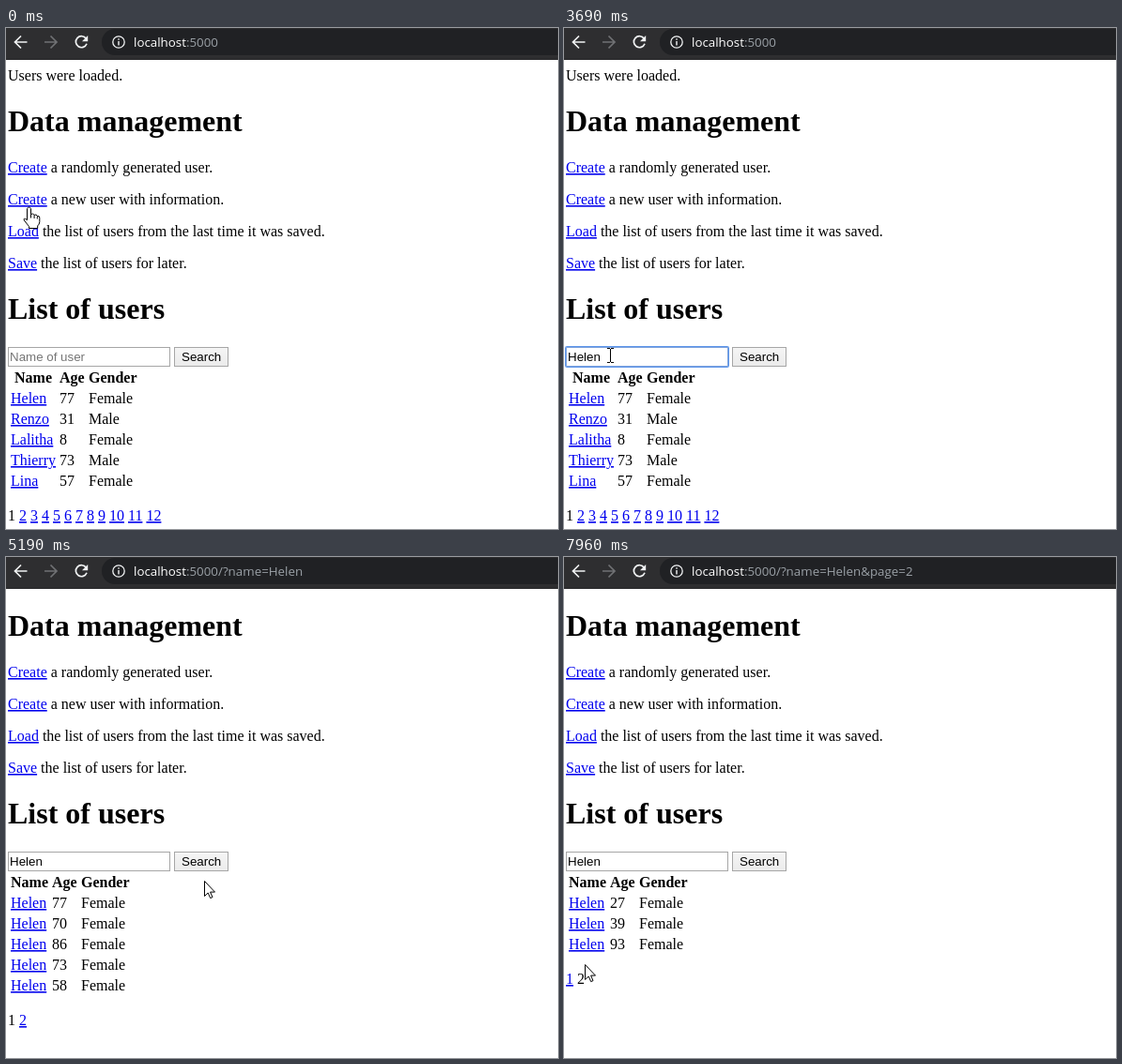
Write an HTML page that moves like this. It is 588 px wide and 534 px high and loops after 8 s.

```html
<!DOCTYPE html>
<html lang="en">
<head>
<meta charset="utf-8">
<title>User list</title>
<style>
html, body { margin: 0; width: 100%; height: 100%; overflow: hidden; background: #fff; }
svg { display: block; width: 588px; height: 534px; }
text { font: 16px "Liberation Serif", "Times New Roman", serif; fill: #000; }
.h1 { font-size: 32px; font-weight: bold; }
.th { font-weight: bold; }
.a {
  fill: #0000ee;
  text-decoration: underline 1px;
  text-underline-offset: 1px;
  text-decoration-skip-ink: auto;
}
.active { fill: #ff0000; }
.ui { font: 13.333px "Liberation Sans", Arial, sans-serif; }
.hint { fill: #757575; }
.url { font: 13.35px "Open Sans", "Noto Sans", sans-serif; fill: #9aa0a6; }
.host { fill: #fff; }
.icon { fill: none; stroke: #f1f3f4; stroke-width: 1.7; }
</style>
</head>
<body>
<svg viewBox="0 0 588 534">
  <defs>
    <linearGradient id="face" x1="0" y1="0" x2="0" y2="1">
      <stop offset="0" stop-color="#f5f5f5"/><stop offset="1" stop-color="#ebebeb"/>
    </linearGradient>
  </defs>
  <rect width="588" height="534" fill="#fff"/>
  <rect width="588" height="34" fill="#2e2e30"/>
  <rect y="33" width="588" height="1" fill="#252527"/>
  <rect x="102" y="1" width="520" height="28" rx="14" fill="#202124"/>
  <path class="icon" d="M22.5 15H10M16 8.5L9.5 15L16 21.5"/>
  <path class="icon" style="stroke:#707174" d="M41 15H53.5M47.5 8.5L54 15L47.5 21.5"/>
  <path class="icon" d="M85.3 11.3A6 6 0 1 0 86 16.8"/>
  <path d="M87.2 8V14.2H81Z" fill="#f1f3f4"/>
  <circle class="icon" cx="120" cy="15" r="6.2" style="stroke-width:1.3"/>
  <path d="M119.3 11.3h1.4v1.5h-1.4zM119.3 14h1.4v4.6h-1.4z" fill="#f1f3f4"/>
  <text class="url" x="136" y="20"><tspan class="host">localhost</tspan><tspan id="path"></tspan></text>
  <g id="page"></g>
  <g id="form">
    <rect id="field" x="2.5" y="340.5" width="172" height="20" fill="#fff" stroke="#a6a6a6"/>
    <rect id="ring" x="1.5" y="339.5" width="174" height="22" rx="1" fill="none" stroke="#5b94ea"/>
    <text id="value" class="ui" x="4" y="355"></text>
    <rect id="caret" y="343" width="1" height="15"/>
    <rect id="button" x="179.5" y="340.5" width="57" height="20" fill="url(#face)"/>
    <text class="ui" x="187" y="355">Search</text>
  </g>
  <g id="mouse" stroke="#000" stroke-linejoin="round">
    <path id="arrow" fill="#fff" d="M.5 .5V16.5L4.2 13L6.7 18.6L9 17.6L6.6 12.1H11.5Z"/>
    <g id="hand" transform="translate(.5 .5)">
      <path fill="#fff" d="M-2 2Q0 -1.2 2 2V8Q4.4 6.6 5.6 8.8Q8 7.6 8.8 9.9Q11.3 9.4 11.3 12V16Q11 19 9.2 20.4V23H0V21L-5.2 14.5Q-6 10.8 -2 14.2Z"/>
      <path fill="none" d="M2 8V12M5.6 9V12.5M8.8 10V13"/>
    </g>
    <path id="beam" fill="none" d="M-3 -6.5H0M1 -6.5H4M.5 -6V8M-3 8.5H0M1 8.5H4"/>
  </g>
</svg>
<script>
const LOOP = 8000;
const SEARCH = 5190, NEXT = 7280;
const NAME = "Helen";
const KEYS = [2450, 2630, 2760, 2940, 3140];
const $ = id => document.getElementById(id);
const show = (id, on) => $(id).setAttribute("visibility", on ? "visible" : "hidden");

// link text, link end, rest of the line, line end
const ACTIONS = [
  ["Create", 44, "a randomly generated user.", 220],
  ["Create", 44, "a new user with information.", 232],
  ["Load", 35, "the list of users from the last time it was saved.", 340],
  ["Save", 33, "the list of users for later.", 193]
];
const repeat = ages => ages.map(age => [NAME, age, "Female"]);
const PAGES = [
  { path: ":5000", shift: 0, cols: [5, 57, 88], head: 9, count: 12, current: 1,
    rows: [[NAME, 77, "Female"], ["Renzo", 31, "Male"], ["Lalitha", 8, "Female"],
           ["Thierry", 73, "Male"], ["Lina", 57, "Female"]] },
  { path: `:5000/?name=${NAME}`, shift: -26, cols: [5, 49, 80], head: 5, count: 2, current: 1,
    rows: repeat([77, 70, 86, 73, 58]) },
  { path: `:5000/?name=${NAME}&amp;page=2`, shift: -26, cols: [5, 49, 80], head: 5, count: 2, current: 2,
    rows: repeat([27, 39, 93]) }
];

// start, end, from, to
const MOVES = [
  [660, 1400, 24, 190, 49, 348],
  [4150, 4760, 49, 348, 211, 345],
  [5650, 6400, 211, 345, 20, 491],
  [7600, 7960, 20, 491, 22, 434]
];

const text = (x, y, body, cls = "") => `<text x="${x}" y="${y}" class="${cls}">${body}</text>`;
const link = (body, cls = "") => `<tspan class="a ${cls}">${body}</tspan>`;
const pagerY = p => 415 + p.shift + 22 * p.rows.length;

function pageMarkup(p, pressed) {
  const d = p.shift;
  let out = d ? "" : text(2, 56, "Users were loaded.");
  out += text(2, 110 + d, "Data management", "h1") + text(2, 310 + d, "List of users", "h1");
  ACTIONS.forEach(([a, , rest], i) => out += text(2, 154 + d + 34 * i, `${link(a)} ${rest}`));
  ["Name", "Age", "Gender"].forEach((h, i) => out += text(i ? p.cols[i] : p.head, 378 + d, h, "th"));
  p.rows.forEach((row, r) => row.forEach((cell, c) =>
    out += text(p.cols[c], 400 + d + 22 * r, c ? cell : link(cell))));
  const nums = Array.from({ length: p.count }, (_, i) => i + 1);
  return out + text(2, pagerY(p), nums.map(n =>
    n === p.current ? n : link(n, pressed && n === 2 ? "active" : "")).join(" "));
}

function cursorKind(p, x, y) {
  const d = p.shift;
  const on = (base, end, up = 14, down = 4) => y >= base - up && y < base + down && x < end;
  for (let i = 0; i < 4; i++) {
    const [, linkEnd, , end] = ACTIONS[i], base = 154 + d + 34 * i;
    if (on(base, linkEnd)) return "hand";
    if (on(base, end)) return "beam";
  }
  if (on(310 + d, 169, 28, 8) || on(361 + d, 175, 21, 0)) return "beam";
  for (let r = 0; r < p.rows.length; r++) {
    const base = 400 + d + 22 * r;
    if (on(base, 43)) return "hand";
    if (on(base, p.cols[2] + 47) && x > p.cols[2]) return "beam";
  }
  if (on(pagerY(p), 22)) return (x < 12 ? 1 : 2) === p.current ? "beam" : "hand";
  return "arrow";
}

function mouseAt(t) {
  let x = MOVES[0][2], y = MOVES[0][3];
  for (const [a, b, x0, y0, x1, y1] of MOVES) {
    if (t < a) break;
    const k = Math.min(1, (t - a) / (b - a)), e = k * k * (3 - 2 * k);
    x = x0 + (x1 - x0) * e;
    y = y0 + (y1 - y0) * e;
  }
  return [Math.round(x), Math.round(y)];
}

function caretOn(t) {
  if (t < 1720 || t >= 5060) return false;
  if (t < 2450) return t < 2200;
  return t < 3690 || (t >= 4190 && t < 4690);
}

let shown = "";
function draw(t) {
  const n = t < SEARCH ? 0 : t < NEXT ? 1 : 2;
  const p = PAGES[n];
  const pressed = t >= 7150 && t < 7220;
  const key = n + "-" + pressed;
  if (key !== shown) {
    shown = key;
    $("path").innerHTML = p.path;
    $("page").innerHTML = pageMarkup(p, pressed);
    $("form").setAttribute("transform", `translate(0 ${p.shift})`);
  }

  const typed = NAME.slice(0, KEYS.filter(k => t >= k).length);
  const value = $("value");
  value.textContent = typed || "Name of user";
  value.setAttribute("class", typed ? "ui" : "ui hint");
  const focus = t >= 1720 && t < 5060;
  show("ring", focus);
  $("field").setAttribute("stroke", focus ? "#7fa3dc" : "#a6a6a6");
  show("caret", caretOn(t));
  $("caret").setAttribute("x", typed ? Math.round(4 + value.getComputedTextLength()) : 4);

  const [x, y] = mouseAt(t);
  const hover = n === 0 && x >= 179 && x < 237 && y >= 340 && y < 361;
  const down = t >= 5060 && t < 5120;
  $("button").setAttribute("stroke", hover ? "#7c7c7c" : "#a6a6a6");
  $("button").setAttribute("fill", down ? "#e4e4e4" : "url(#face)");

  // the pointer keeps its shape after a page load until it moves
  const kind = t >= NEXT && t < 7600 ? "hand" : cursorKind(p, x, y);
  ["arrow", "hand", "beam"].forEach(id => show(id, id === kind));
  $("mouse").setAttribute("transform", `translate(${x} ${y})`);
}

const start = performance.now();
function tick() {
  draw((performance.now() - start) % LOOP);
  requestAnimationFrame(tick);
}
tick();
</script>
</body>
</html>
```
